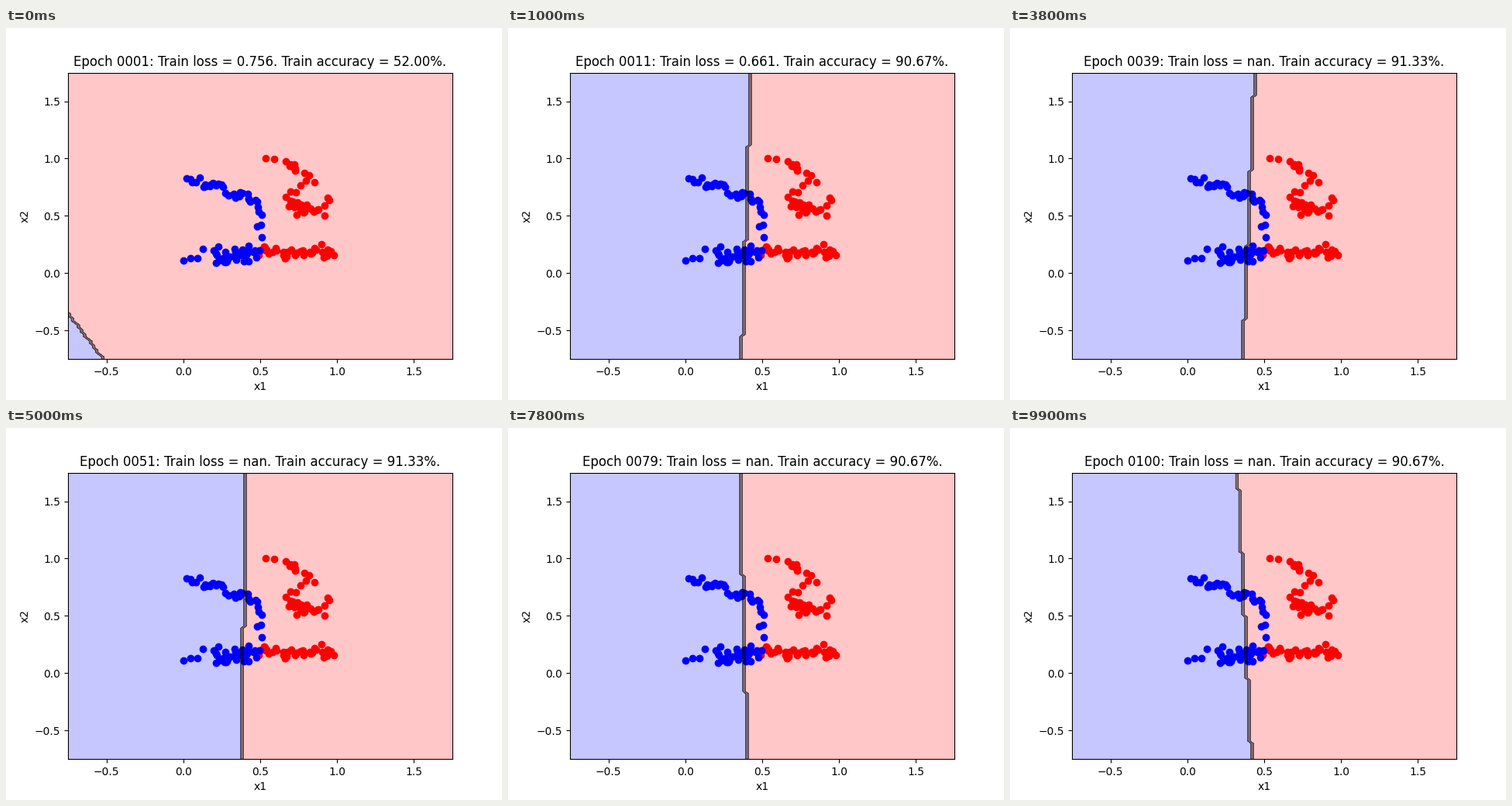
A matplotlib script for the animation above (10000 ms loop, 640x480 px).

```python
import numpy as np
import matplotlib.pyplot as plt
from matplotlib.animation import FuncAnimation

EPOCHS = 100
NAN_FROM = 15
rng = np.random.default_rng(4)


def cluster(n, spread, *keys):
    """Points strewn along a path through a few stage positions."""
    px, py = np.array(keys, float).T
    t = np.linspace(0, len(keys) - 1, n)
    knots = np.arange(len(keys))
    px = np.interp(t, knots, px) + rng.normal(0, spread, n)
    py = np.interp(t, knots, py) + rng.normal(0, spread, n)
    return (px - 80) / 198.4 - .75, (427.2 - py) / 147.84 - .75


def line(epoch):
    """Decision line x = mid + slope * (y - 0.5)."""
    late = np.interp(epoch, [19, 39, 51, 79, 100],
                     [.048, .0303, .0145, -.0195, -.0358])
    slope = late - .622 * .722 ** (epoch - 1)
    mid = .387 + .42 * slope - 1.383 * .408 ** (epoch - 1)
    return mid, slope


def title(epoch):
    loss = .756 - .0095 * (epoch - 1) if epoch < NAN_FROM else float("nan")
    hits = round(np.interp(epoch, [2, 5, 8], [78, 133, 136]))
    hits += 28 <= epoch < 62
    return (f"Epoch {epoch:04d}: Train loss = {loss:.3f}. "
            f"Train accuracy = {hits / 150:.2%}.")


fig, ax = plt.subplots(figsize=(6.4, 4.8), dpi=100)
ax.set(xlim=(-.75, 1.75), ylim=(-.75, 1.75), xlabel="x1", ylabel="x2")

clusters = [
    ("red", cluster(37, 3, (337, 171), (371, 174), (373, 184), (395, 192),
                    (368, 212), (366, 228), (380, 226), (381, 239),
                    (394, 230), (407, 240), (414, 216))),
    ("red", cluster(35, 4, (327, 288), (341, 282), (346, 292), (363, 289),
                    (373, 285), (380, 288), (397, 288), (407, 291),
                    (425, 288))),
    ("blue", cluster(36, 2.5, (233, 194), (252, 201), (264, 203), (275, 202),
                     (289, 214), (303, 215), (315, 221), (325, 232),
                     (328, 266))),
    ("blue", cluster(34, 4, (229, 297), (262, 281), (277, 297), (285, 301),
                     (290, 288), (301, 290), (307, 300), (312, 284),
                     (327, 290))),
]
for color, (x, y) in clusters:
    ax.scatter(x, y, color=color, zorder=1.5)

axis = np.linspace(-.75, 1.75, 128)
xx, yy = np.meshgrid(axis, axis)
layers = []


def clear():
    while layers:
        layers.pop().remove()
    return []


def update(i):
    clear()
    epoch = i + 1
    mid, slope = line(epoch)
    z = (xx > mid + slope * (yy - .5)).astype(float)
    layers.append(ax.contourf(xx, yy, z, levels=[-1, .5, 2],
                              colors=["#c7c7ff", "#ffc7c7"], zorder=1))
    layers.append(ax.contourf(xx, yy, z, levels=[.05, .95],
                              colors="black", alpha=.42, zorder=2))
    layers.append(ax.contour(xx, yy, z, levels=[.08, .92], colors="black",
                             linewidths=.8, alpha=.5, zorder=2.1))
    ax.set_title(title(epoch))
    return []


anim = FuncAnimation(fig, update, frames=EPOCHS, init_func=clear,
                     interval=100, repeat=True, repeat_delay=0, blit=False)
plt.show()
```
